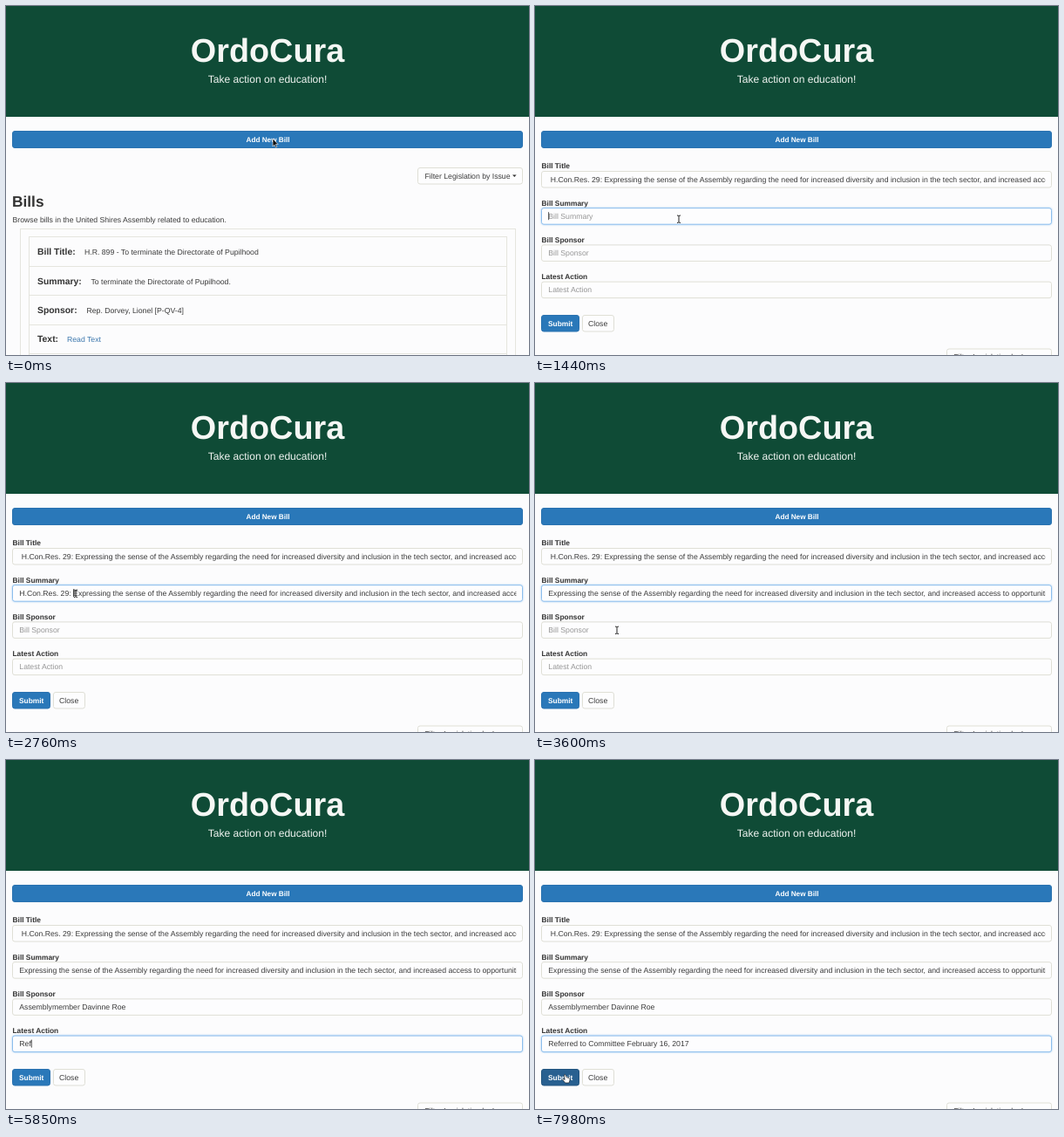
Animation of 600x400 px, one loop 8000 ms. Source, as an HTML page:

```html
<!DOCTYPE html>
<html lang="en">
<head>
<meta charset="utf-8">
<title>Add a bill</title>
<style>
  html, body { margin: 0; width: 100%; height: 100%; overflow: hidden; background: #fcfcfd; }
  svg { display: block; width: 600px; height: 400px; }
  text { font: 8.7px "Liberation Sans", Arial, sans-serif; fill: #3a3a3a; white-space: pre; text-rendering: geometricPrecision; }
  .strong { font-weight: bold; font-size: 8.4px; fill: #333; }
  .term { font-weight: bold; font-size: 10.4px; fill: #333; }
  .light { fill: #fff; }
  .line { fill: none; stroke: #e5e5de; }
  .box { fill: #fdfdfe; stroke: #dfdfd6; }
  .focus { stroke: #8bbdec; filter: drop-shadow(0 0 1px #a9cff2); }
  .blue { fill: #2a78b9; stroke: #2a72b0; }
  .hover { fill: #286090; stroke: #245680; }
  .hint { fill: #969696; }
</style>
</head>
<body>
<svg viewBox="0 0 600 400">
  <defs>
    <clipPath id="inner"><rect x="14" y="180" width="571.5" height="160"/></clipPath>
    <clipPath id="reveal"><rect id="revealBox" y="174" width="600" height="0"/></clipPath>
  </defs>
  <rect width="600" height="400" fill="#fcfcfd"/>
  <rect width="600" height="127" fill="#0f4b36"/>
  <text x="300" y="64" text-anchor="middle" style="font-size:37.8px;font-weight:bold;fill:#f5f7f4">OrdoCura</text>
  <text x="300" y="87.8" text-anchor="middle" style="font-size:12.05px;fill:#f0f4f1">Take action on education!</text>
  <rect class="blue" x="7.5" y="143.5" width="585" height="19" rx="2.5"/>
  <text class="strong light" x="300.5" y="156.2" text-anchor="middle" style="font-size:8.2px">Add New Bill</text>

  <g id="form" clip-path="url(#reveal)">
    <g id="fields"></g>
    <path id="squiggle" stroke="#d9533f" stroke-width="1" stroke-dasharray="1.5 1"/>
    <rect id="caret" width=".8" height="9" fill="#222"/>
    <rect id="submit" class="blue" x="7.5" y="354.5" width="43" height="18.5" rx="2.5"/>
    <text class="strong light" x="15" y="366.7">Submit</text>
    <rect class="box" x="54.5" y="354.5" width="36" height="18.5" rx="2.5"/>
    <text x="61" y="366.7">Close</text>
  </g>

  <g id="bills">
    <rect class="box" x="472.5" y="185.5" width="120" height="18.5" rx="2.5"/>
    <text x="480.5" y="197.7">Filter Legislation by Issue</text>
    <path d="M581 193.5h4.6l-2.3 2.5z" fill="#333"/>
    <text class="term" x="7" y="230.3" style="font-size:17.3px">Bills</text>
    <text x="7.5" y="247.5">Browse bills in the United Shires Assembly related to education.</text>
    <rect class="line" x="16.5" y="255.5" width="568" height="400"/>
    <rect class="line" x="26.5" y="264.5" width="548" height="400"/>
    <g id="rows"></g>
  </g>

  <g id="pointers" stroke="#fff" stroke-width=".6" fill="#111">
    <path id="arrow" d="M0 -4V5L2 3.2 3.4 6.2 4.8 5.5 3.4 2.6H6.2Z"/>
    <path id="beam" d="M-2 -4Q0 -4 0 -3Q0 -4 2 -4M0 -3V3.5M-2 4.5Q0 4.5 0 3.5Q0 4.5 2 4.5" fill="none" stroke="#222" stroke-width="1"/>
    <path id="hand" d="M-1.6 -4.2q1 -.9 1.6 .2L1.2 -1.2 4 -.6Q5.4 0 5 2L4 5H-.4L-3.2 1.5Q-3.2 .3 -2 .7L-.8 1.6Z" fill="#fff" stroke="#111"/>
  </g>
</svg>
<script>
const LOOP = 8000, FORM_HEIGHT = 207.5, TEXT_X = 15.3;
const $ = id => document.getElementById(id);
const clamp = v => Math.max(0, Math.min(1, v));
const ease = v => { v = clamp(v); return v * v * (3 - 2 * v); };
const mix = (a, b, k) => a + (b - a) * k;
const show = (id, on) => $(id).setAttribute('visibility', on ? 'inherit' : 'hidden');

const PREFIX = 'H.Con.Res. 29: ';
const PURPOSE = 'Expressing the sense of the Assembly regarding the need for increased diversity and inclusion ' +
  'in the tech sector, and increased access to opportunities';
const TITLE_WORD = 'Assemblymember';
const SPONSOR = TITLE_WORD + ' Davinne Roe';
const ACTION = 'Referred to Committee';
const ACTION_DATE = ' February 16, 2017';

const fields = ['Bill Title', 'Bill Summary', 'Bill Sponsor', 'Latest Action'].map((label, i) => {
  const top = 189.5 + i * 42.2;
  $('fields').insertAdjacentHTML('beforeend', `
    <text class="strong" x="7.5" y="${top - 3.2}">${label}</text>
    <rect class="box" x="7.5" y="${top}" width="585" height="18.5" rx="2.5"/>
    <g clip-path="url(#inner)"><text x="${TEXT_X}" y="${top + 12}"></text></g>`);
  const group = $('fields').lastElementChild;
  return { label, top, box: group.previousElementSibling, text: group.firstElementChild };
});

[
  ['Bill Title:', 90, 'H.R. 899 - To terminate the Directorate of Pupilhood'],
  ['Summary:', 97.5, 'To terminate the Directorate of Pupilhood.'],
  ['Sponsor:', 92.5, 'Rep. Dorvey, Lionel [P-QV-4]'],
  ['Text:', 70, 'Read Text']
].forEach(([term, x, value], i) => {
  const y = 285.2 + i * 33.4;
  $('rows').insertAdjacentHTML('beforeend', `
    <text class="term" x="36" y="${y}">${term}</text>
    <text x="${x}" y="${y}" ${i === 3 ? 'style="fill:#3a76ad"' : ''}>${value}</text>
    <path class="line" d="M27 ${Math.round(y + 12.6) + .5}H574"/>`);
});

// Typed part of a string between two times.
const typed = (string, t, start, end) =>
  string.slice(0, Math.floor(string.length * clamp((t - start) / (end - start)) + 1e-6));

// Mouse path: time, x, y; straight eased moves between the stops.
const path = [
  [0, 306, 156], [420, 306, 156], [720, 165, 200], [1060, 165, 200], [1300, 165, 244],
  [1950, 165, 244], [2450, 80, 241], [3150, 80, 241], [3500, 94, 283], [7450, 94, 325], [7850, 35, 365]
];

function mouseAt(t) {
  const i = path.findIndex(p => p[0] > t);
  if (i < 0) return path[path.length - 1].slice(1);
  const [t0, x0, y0] = path[i - 1], [t1, x1, y1] = path[i];
  const k = ease((t - t0) / (t1 - t0));
  return [mix(x0, x1, k), mix(y0, y1, k)];
}

const textWidth = (node, count) => count ? node.getSubStringLength(0, count) : 0;

// Times of focus changes and of the end of each edit; the caret blinks from these on.
const edits = [780, 950, 1330, 1750, 2600, 3050, 3750, 5310, 5550, 6750, 7400];
const typingSpans = [[4060, 5310], [5700, 6750], [6850, 7400]];

function drawForm(t) {
  const open = ease((t - 200) / 250);
  $('revealBox').setAttribute('height', FORM_HEIGHT * open + 1);
  show('form', open > 0);
  $('bills').setAttribute('transform', `translate(0 ${FORM_HEIGHT * open})`);

  const erased = Math.floor(PREFIX.length * clamp((t - 2780) / 270));
  const remaining = PREFIX.slice(0, PREFIX.length - erased);
  const values = [
    t < 950 ? '' : ' ' + PREFIX + PURPOSE,
    t < 1750 ? '' : remaining + PURPOSE,
    typed(SPONSOR, t, ...typingSpans[0]),
    typed(ACTION, t, ...typingSpans[1]) + typed(ACTION_DATE, t, ...typingSpans[2])
  ];
  const active = t < 780 ? -1 : t < 1330 ? 0 : t < 3750 ? 1 : t < 5550 ? 2 : 3;

  fields.forEach((field, i) => {
    const content = values[i] || field.label;
    if (field.text.textContent !== content) field.text.textContent = content;
    field.text.setAttribute('class', values[i] ? '' : 'hint');
    field.box.setAttribute('class', i === active ? 'box focus' : 'box');
  });

  const lastEdit = edits.filter(e => e <= t).pop() || 0;
  const typing = typingSpans.some(([start, end]) => t > start && t < end);
  const lit = active >= 0 && (typing || (t - lastEdit) % 1000 < 500);
  show('caret', lit);
  if (lit) {
    const { text, top } = fields[active];
    const count = active === 1 && t > 2600 ? remaining.length : values[active].length;
    $('caret').setAttribute('x', Math.min(585, TEXT_X + textWidth(text, count)));
    $('caret').setAttribute('y', top + 4.5);
  }

  const misspelt = active === 2 && values[2].length > TITLE_WORD.length;
  $('squiggle').setAttribute('d', misspelt
    ? `M${TEXT_X} ${fields[2].top + 13.7}h${textWidth(fields[2].text, TITLE_WORD.length)}` : '');
}

function drawMouse(t) {
  const [x, y] = mouseAt(t);
  const shown = t < 4060 || t > 7450;
  const overSubmit = shown && x > 7 && x < 51 && y > 354 && y < 373;
  const overField = t > 450 && fields.some(f => y > f.top && y < f.top + 18.5);
  const kind = !shown ? '' : overSubmit ? 'hand' : overField ? 'beam' : 'arrow';
  for (const id of ['arrow', 'beam', 'hand']) show(id, id === kind);
  $('pointers').setAttribute('transform', `translate(${x} ${y})`);
  $('submit').setAttribute('class', overSubmit ? 'hover' : 'blue');
}

const began = performance.now();
function tick() {
  const t = (performance.now() - began) % LOOP;
  drawForm(t);
  drawMouse(t);
  requestAnimationFrame(tick);
}
tick();
</script>
</body>
</html>
```
